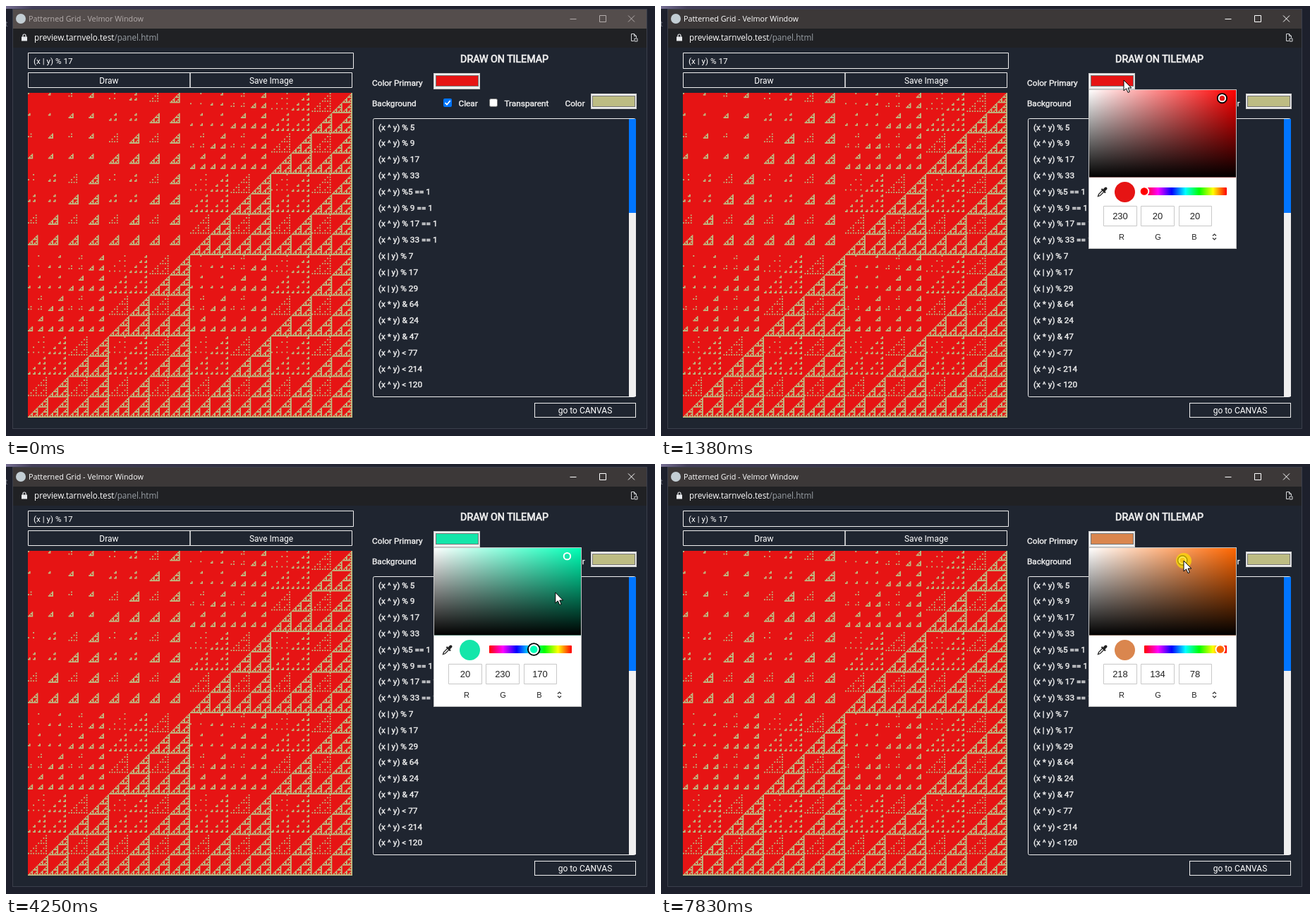
Animation of 920 by 609 pixels, one loop 8000 ms. Source, as an HTML page with a canvas:

```html
<!DOCTYPE html>
<html lang="en">
<head>
<meta charset="utf-8">
<title>Patterned Grid</title>
<style>
html, body { margin: 0; width: 100%; height: 100%; overflow: hidden; background: #1d202c; }
svg { position: absolute; left: 0; top: 0; }
canvas { position: absolute; left: 31px; top: 123px; width: 460px; height: 460px; }
text { font: 12px Roboto, sans-serif; fill: #fff; white-space: pre; }
.ui { font-family: "Open Sans", sans-serif; }
.b { font-size: 11.8px; fill: #f0f0f0; stroke: #f0f0f0; stroke-width: .4px; }
.head { font-size: 14.2px; stroke-width: .7px; }
.mid { text-anchor: middle; }
.box { fill: none; stroke: #f0f0f0; }
.pick text { font: 13px "Liberation Sans", Arial, sans-serif; fill: #222; text-anchor: middle; }
.pick .rgb { font-size: 11px; }
.on { fill: #f0f0f0; }
.on + text { fill: #666; stroke: none; }
</style>
</head>
<body>
<svg width="920" height="609" viewBox="0 0 920 609">
  <defs>
    <linearGradient id="strip"><stop stop-color="#766f92"/><stop offset=".04" stop-color="#443f59"/><stop offset=".6" stop-color="#1f212d"/></linearGradient>
    <linearGradient id="white"><stop stop-color="#fff"/><stop offset="1" stop-color="#fff" stop-opacity="0"/></linearGradient>
    <linearGradient id="black" x2="0" y2="1"><stop stop-opacity="0"/><stop offset="1"/></linearGradient>
    <linearGradient id="rainbow"></linearGradient>
  </defs>

  <!-- window frame -->
  <rect width="920" height="609" fill="#1d202c"/>
  <rect width="920" height="4" fill="url(#strip)"/>
  <text class="ui" x="-1" y="29" style="font-size:10px;fill:#777b88">t</text>
  <rect x="9.5" y="4.5" width="899" height="594" fill="#1f2530" stroke="#3b3f4b"/>
  <rect id="titleBar" x="10" y="5" width="898" height="27"/>
  <rect x="10" y="32" width="898" height="27" fill="#202124"/>
  <circle cx="21" cy="18" r="7" fill="#c3ced4"/>
  <text id="title" class="ui" x="32" y="22" style="font-size:10.8px;fill:inherit">Patterned Grid - Velmor Window</text>
  <path id="controls" d="M799.5 18.5h9M841.5 13.5h9v9h-9zM882 13.5l9 9m0-9l-9 9" fill="none"/>
  <path d="M22 43.5h8v6h-8z" fill="#e8eaed"/>
  <path d="M24 44v-2a2 2 0 0 1 4 0v2" fill="none" stroke="#e8eaed" stroke-width="1.2"/>
  <text class="ui" x="40" y="49" style="font-size:11.7px">preview.tarnvelo.test<tspan fill="#9aa0a6">/panel.html</tspan></text>
  <path d="M890 49.5h-3.500v-10h4l3 3v2.500M890.500 39.5v3h3M891 46h4v4h-4z" fill="none" stroke="#d5d7da"/>

  <!-- left column -->
  <path class="box" d="M31.5 66.5h461v22h-461zM31.5 94.5h229.500v21h-229.500zM261 94.5h229.500v21h-229.500z"/>
  <text x="39" y="82" style="font-size:11.7px">(x | y) % 17</text>
  <text class="mid" x="146" y="110">Draw</text>
  <text class="mid" x="376" y="110">Save Image</text>

  <!-- right column -->
  <text class="b head mid" x="706.5" y="80">DRAW ON TILEMAP</text>
  <text class="b" x="519" y="113">Color Primary</text>
  <text class="b" x="519" y="142">Background</text>
  <text class="b" x="641.5" y="142">Clear</text>
  <text class="b" x="706.5" y="142">Transparent</text>
  <text class="b" x="792.5" y="142">Color</text>
  <rect x="620" y="131" width="12" height="12" rx="2" fill="#0075ff"/>
  <path d="M622.5 137l2.500 2.700 4.700-5.700" fill="none" stroke="#fff" stroke-width="1.8"/>
  <rect x="685.5" y="131.5" width="11" height="11" rx="2" fill="#fff" stroke="#767676"/>
  <g fill="#efefef" stroke="#c8c8c8">
    <rect x="606.5" y="95.5" width="65" height="22"/>
    <rect x="829.5" y="124.5" width="64" height="21"/>
  </g>
  <g stroke="#777">
    <rect id="primary" x="609.5" y="98.5" width="60" height="15"/>
    <rect x="831.5" y="127.5" width="60" height="15" fill="#bdbc83"/>
  </g>
  <g id="list"></g>
  <rect class="box" x="520.5" y="159.5" width="372" height="394" rx="2"/>
  <path d="M883 160h10v393h-10z" fill="#f0f0f0"/>
  <path d="M883 160h10v133h-10z" fill="#0075ff"/>
  <rect class="box" x="749.5" y="562.5" width="143" height="20"/>
  <text class="mid" x="821" y="577">go to CANVAS</text>

  <!-- colour picker -->
  <g id="picker" class="pick">
    <rect x="606.5" y="118.5" width="209" height="225" fill="#fff" stroke="#c4c4c4"/>
    <rect id="tone" x="607" y="119" width="208" height="123.5"/>
    <rect x="607" y="119" width="208" height="123.5" fill="url(#white)"/>
    <rect x="607" y="119" width="208" height="123.5" fill="url(#black)"/>
    <path d="M619.5 269.5l1-3 6-6 2 2-6 6z" fill="none" stroke="#222" stroke-width="1.3"/>
    <path d="M624.5 259l5.500 5.500M627.5 261.5l3-3" fill="none" stroke="#222" stroke-width="2.2"/>
    <path d="M629 260l1.500-1.500" stroke="#222" stroke-width="4" stroke-linecap="round"/>
    <circle id="chip" cx="657.5" cy="263.5" r="14.5"/>
    <rect x="685" y="257" width="117" height="11" rx="1" fill="url(#rainbow)"/>
    <g id="hueMark"><circle r="8.3" fill="none" stroke="#000" stroke-width="2"/><circle r="6.3" stroke="#fff" stroke-width="2"/></g>
    <g id="toneMark"><circle r="6.5" fill="none" stroke="#000" stroke-width="2"/><circle r="4.7" stroke="#fff" stroke-width="2"/></g>
    <path d="M627.5 283.5h47v28h-47zM680.5 283.5h47v28h-47zM734.5 283.5h46v28h-46z" fill="none" stroke="#c8c8c8"/>
    <text class="num" x="651" y="302"></text>
    <text class="num" x="704" y="302"></text>
    <text class="num" x="757" y="302"></text>
    <text class="rgb" x="653" y="331">R</text>
    <text class="rgb" x="704.5" y="331">G</text>
    <text class="rgb" x="756" y="331">B</text>
    <path d="M782 325.5l2.500-2.500 2.500 2.500M782 328.5l2.500 2.500 2.500-2.500" fill="none" stroke="#333" stroke-width="1.2"/>
  </g>

  <g id="mouse">
    <circle id="halo" r="11" fill="#ffe000"/>
    <path d="M0 0V15L3.500 11.800 6 17.500 8.300 16.500 6 11H10.800Z" fill="#fff" stroke="#000"/>
  </g>
</svg>
<canvas id="art" width="512" height="512"></canvas>

<script>
const $ = id => document.getElementById(id);
const set = (el, attrs) => { for (const k in attrs) el.setAttribute(k, attrs[k]); };
const add = (parent, tag, attrs) => {
  const el = document.createElementNS('http://www.w3.org/2000/svg', tag);
  set(el, attrs);
  return $(parent).appendChild(el);
};
const LOOP = 8000, STEP = 80, ROW = 22.8;

// Every cell whose (x | y) is a multiple of 17 keeps the background colour
const ctx = $('art').getContext('2d');
for (let y = 0; y < 256; y++) {
  for (let x = 0; x < 256; x++) {
    ctx.fillStyle = (x | y) % 17 ? '#e61414' : '#bdbc83';
    ctx.fillRect(2 * x, 2 * y, 2, 2);
  }
}

for (let i = 0; i <= 6; i++) {
  add('rainbow', 'stop', { offset: i / 6, 'stop-color': `hsl(${360 - 60 * i}, 100%, 50%)` });
}

const formulas = ['^ y) % 5', '^ y) % 9', '^ y) % 17', '^ y) % 33', '^ y) %5 == 1', '^ y) % 9 == 1',
  '^ y) % 17 == 1', '^ y) % 33 == 1', '| y) % 7', '| y) % 17', '| y) % 29', '* y) & 64', '* y) & 24',
  '* y) & 47', '^ y) < 77', '^ y) < 214', '^ y) < 120'];
const rows = formulas.map((f, i) => {
  const row = add('list', 'rect', { x: 521, y: 161 + ROW * i, width: 361, height: 20.5, fill: 'none' });
  add('list', 'text', { class: 'b', x: 528, y: 175.5 + ROW * i }).textContent = '(x ' + f;
  return row;
});

// Each move: start, number of steps, goals; a pair [via, goal] bends the way there
const first = { x: 872, y: 370, hue: 360, s: .913, v: .902, halo: 0 };
const moves = [
  [330, 8, { x: [750, 656], y: [80, 105] }],
  [1140, 1, { halo: .7 }],
  [1380, 1, { halo: 0 }],
  [2130, 9, { x: 731, y: 261 }],
  [3270, 1, { hue: 216, halo: .7 }],
  [3270, 6, { x: [747, 750], y: 263, hue: [179.3, 162.86] }],
  [4090, 2, { halo: 0 }],
  [4090, 5, { x: 798, y: 128 }],
  [4490, 6, { x: 793, y: 270 }],
  [4970, 2, { halo: .7 }],
  [5130, 1, { hue: 24 }],
  [6050, 2, { halo: 0 }],
  [6050, 6, { x: 801, y: 125 }],
  [6700, 1, { halo: .7, s: .935, v: .935 }],
  [6700, 9, { x: 755, y: 138, s: .715, v: .86 }],
  [7670, 3, { x: 741, y: 137, s: .642, v: .855 }]
];
const mix = (a, b, u) => a + (b - a) * u;

function stateAt(t) {
  const now = { ...first };
  for (const [start, steps, goals] of moves) {
    if (t < start) break;
    const u = Math.min(1, (Math.floor((t - start) / STEP) + 1) / steps);
    for (const k in goals) {
      const [via, goal] = [goals[k]].flat();
      now[k] = goal === undefined ? mix(now[k], via, u) : mix(mix(now[k], via, u), mix(via, goal, u), u);
    }
  }
  return now;
}

const rgb = (h, s, v) => [5, 3, 1].map(k => {
  const m = (k + h / 60) % 6;
  return Math.round(255 * v * (1 - s * Math.max(0, Math.min(m, 4 - m, 1))));
});

function mark(id, x, y, color, focus) {
  const g = $(id);
  set(g, { transform: `translate(${x} ${y})` });
  set(g.firstChild, { opacity: focus ? 1 : 0 });
  set(g.lastChild, { fill: color });
}

function draw(t) {
  const { x, y, hue, s, v, halo } = stateAt(t);
  const parts = rgb(hue, s, v), color = `rgb(${parts})`, pure = `rgb(${rgb(hue, 1, 1)})`;
  const active = t >= 1140, onHue = t >= 3270 && t < 6700;
  const ink = active ? '#fff' : '#b3acab';

  set($('titleBar'), { fill: active ? '#3c3838' : '#544d4c' });
  $('title').style.fill = ink;
  set($('controls'), { stroke: ink });
  const hover = t >= 330 && y >= 158 && !active ? Math.floor((y - 158) / ROW) : -1;
  rows.forEach((r, i) => set(r, { class: i === hover ? 'on' : '' }));

  set($('picker'), { visibility: t < 1220 ? 'hidden' : 'visible' });
  for (const id of ['primary', 'chip']) set($(id), { fill: color });
  set($('tone'), { fill: pure });
  mark('hueMark', 685 + 115.5 * (1 - hue / 360), 262.5, pure, onHue);
  mark('toneMark', 606 + 207.5 * s, 118.5 + 124 * (1 - v), color, !onHue);
  document.querySelectorAll('.num').forEach((n, i) => { n.textContent = parts[i]; });

  set($('mouse'), { transform: `translate(${x} ${y})`, visibility: t < 330 ? 'hidden' : 'visible' });
  set($('halo'), { opacity: halo });
}

const begin = performance.now();
function tick() {
  draw((performance.now() - begin) % LOOP);
  requestAnimationFrame(tick);
}
tick();
</script>
</body>
</html>
```
